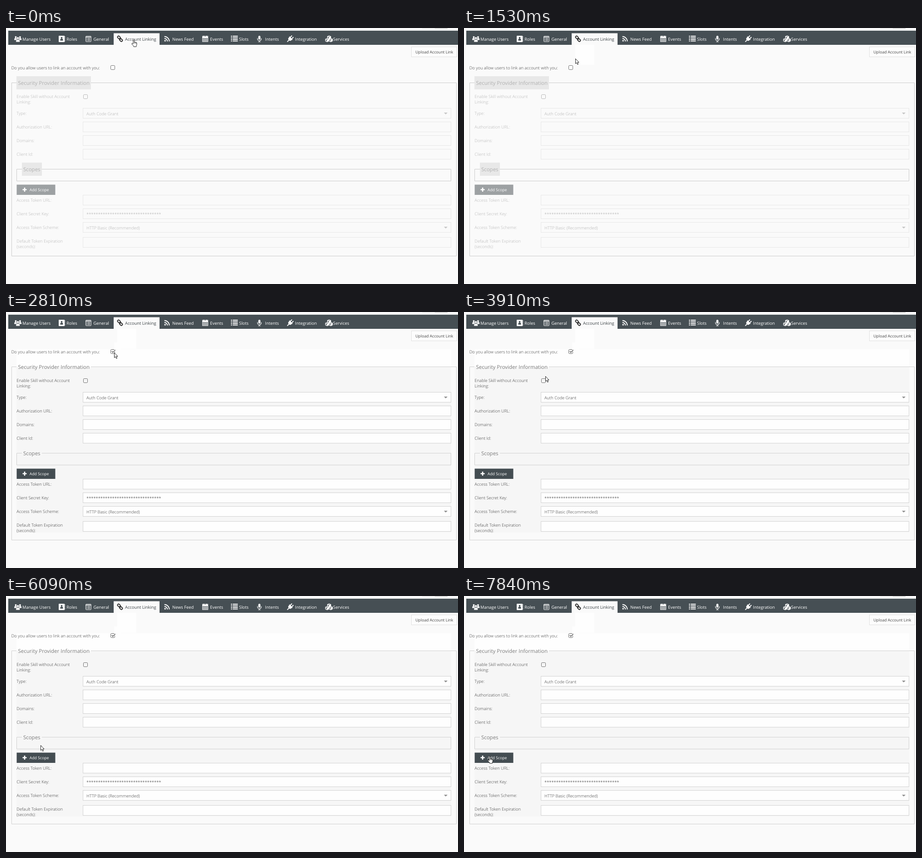
Animation of 995x563 px, one loop 7.99 s. Source, as an HTML page:

```html
<!DOCTYPE html>
<html lang="en">
<head>
<meta charset="utf-8">
<title>Account Linking</title>
<style>
html, body { margin: 0; width: 100%; height: 100%; overflow: hidden; background: #fafafa; }
svg { display: block; width: 100%; height: 100%; }
#stage {
  --label: #b2b2b2; --value: #adadad; --line: #e7e7e7; --field: #fafafa; --caret: #c6c6c6;
  --legend: #b0b0b0; --legend-bg: #e8e8e8; --button: #9da1a3; --box: #b8b8b8; --frame: #cbcbcb;
}
#stage.on {
  --label: #333; --value: #333; --line: #d2d2d2; --field: #fefefe; --caret: #909090;
  --legend: #7c7c7c; --legend-bg: #f6f6f6; --button: #444d52; --box: #707070; --frame: #d0d0d0;
}
text { font: 300 9.33px "Open Sans", sans-serif; text-rendering: geometricPrecision; }
.nav { font-weight: 400; font-size: 9.35px; fill: #fff; }
.small { font-weight: 400; font-size: 8.7px; }
.legend { font-weight: 400; font-size: 11.5px; fill: var(--legend); }
.label { fill: var(--label); }
.value { fill: var(--value); }
.field { fill: var(--field); stroke: var(--line); }
.caret { fill: var(--caret); }
.legend-bg { fill: var(--legend-bg); }
.frame { fill: none; stroke: var(--frame); }
.check { fill: none; stroke: var(--box); }
.line { fill: none; stroke: currentColor; }
.icon { color: #fff; fill: currentColor; }
.active .icon { color: #333; }
.active .nav { fill: #3d4448; }
.cut { color: #464f54; fill: #464f54; }
.pointer { fill: #fff; stroke: #222; stroke-linejoin: round; }
</style>
</head>
<body>
<svg id="stage" viewBox="0 0 995 563" preserveAspectRatio="none">
  <rect width="995" height="563" fill="#fafafa"/>
  <path d="M5 3h990v3H5z" fill="#f0f2f2"/>
  <path d="M916 0h28v2h-28z" fill="#eee"/>
  <path d="M944 0h28v2h-28z" fill="#d9d9d9"/>
  <path d="M5 6h990v31H5z" fill="#464f54"/>
  <path d="M237 11.5h101V37H237z" fill="#fafafa"/>
  <path id="trail" fill="#fefefe"/>
  <g id="panel">
    <path d="M23 82h957v39H23z" fill="#fefefe"/>
    <path d="M23 121h957v364H23z" fill="#f6f6f6"/>
  </g>
  <g id="nav"></g>
  <rect x="892.5" y="41.5" width="100" height="22" fill="#fcfcfc" stroke="#e0e0e0"/>
  <text class="small" x="901.3" y="56" fill="#444">Upload Account Link</text>
  <text x="11.7" y="90.5" fill="#333">Do you allow users to link an account with you:</text>
  <rect id="unchecked" x="230.5" y="82.5" width="9" height="9" rx="1.8" fill="#fdfdfd"/>
  <g id="checked" fill="none" stroke="#666">
    <path d="M239.5 87.5v2q0 2-2 2h-5q-2 0-2-2v-5q0-2 2-2h6"/>
    <path d="M232.7 86.3l2.6 2.5 5.3-5.3" stroke-width="1.6"/>
  </g>
  <path class="frame" d="M23 120.5H12.5v381h979v-381H187"/>
  <path class="frame" d="M35 310.5H23.5v26h956v-26H79"/>
  <path class="legend-bg" d="M23 106h164v29H23zM35 296h44v29H35z"/>
  <path id="legend-top" d="M23 106h164v15H23z" fill="#fefefe"/>
  <text class="legend" x="26.5" y="124.5">Security Provider Information</text>
  <text class="legend" x="37.9" y="314.8">Scopes</text>
  <text class="label" x="23.3" y="154">Enable Skill without Account<tspan x="23.3" dy="12">Linking:</tspan></text>
  <rect class="check" x="170.5" y="146.5" width="9" height="9" rx="1.8"/>
  <g id="form"></g>
  <path d="M23.5 344.5h85V367h-85z" style="fill:var(--button)"/>
  <path d="M36.5 355.5h9M41 351v9" stroke="#fff" stroke-width="2.6"/>
  <text class="small" x="51.7" y="358.7" fill="#fff">Add Scope</text>
  <circle id="click" cx="238.5" cy="89.5" r="7.5" fill="none" stroke="#333"/>
  <g id="cursor">
    <path id="arrow" class="pointer" d="M.5.5v11L3 9.2l1.8 4.1 1.8-.8-1.7-4H8z"/>
    <g id="hand">
      <path class="pointer" d="M4 10V2a1.2 1.2 0 0 1 2.4 0v4q1.2-.7 1.9.4 1.3-.6 1.8.5 1.7-.4 1.7 1.2v3q0 2-1 3v2H5v-1.5L.9 10.4q-.5-1.5.8-1.6z"/>
      <path d="M6.4 6v3m1.9-2.5V9m1.8-2v2" stroke="#222" stroke-width=".8"/>
    </g>
  </g>
</svg>
<script>
const LOOP = 7990, STEP = 137;
const CLICK = 2650, ENABLED = 2810;
const $ = id => document.getElementById(id);
const repeat = (n, draw) => Array.from({ length: n }, (_, i) => draw(i)).join('');

const stroke = (d, width = 1) => `<path class="line" stroke-width="${width}" d="${d}"/>`;
const box = (w, h, rest = '') => `<rect class="line" x="1" y="1" width="${w}" height="${h}" ${rest}/>`;
const person = (x, y, r) => `<g transform="translate(${x} ${y}) scale(${r})">
  <circle r="1"/><path d="M-1.6 3.2v-1q0-1.2 1.6-1.2t1.6 1.2v1z"/></g>`;
const cube = (x, y) => `<g transform="translate(${x} ${y})">
  ${stroke('M0 0l3.6-1.5L7.2 0v4L3.6 5.7 0 4zl3.6 1.5L7.2 0M3.6 1.5v4', 1.3)}<path d="M3.6 1.5L7.2 0v4L3.6 5.7z"/></g>`;
const chainLink = (x, y) =>
  `<rect class="line" x="-3.5" y="-2.3" width="7" height="4.6" rx="2.2" stroke-width="1.9" transform="translate(${x} ${y}) rotate(45)"/>`;

const icons = {
  users: person(3.3, 3, 2) + person(12.7, 3, 2) + `<g stroke="#464f54" stroke-width=".3">${person(8, 5.3, 2.7)}</g>`,
  badge: `<rect x=".5" width="13" height="14" rx="1"/><g class="cut">${person(7, 4.7, 1.9)}</g>` +
    stroke(repeat(3, i => `M14.5 ${2 + i * 4}v2`)),
  form: box(11.5, 12, 'rx="1"') + stroke('M1 3h11', 1.5) +
    stroke(repeat(3, i => `M2.5 ${5.7 + i * 2.3}h1.5m1 0h5.5`)),
  link: chainLink(4.5, 3.8) + chainLink(9, 9.5) + stroke('M5.3 5.3l3 3', 1.9),
  feed: '<circle cx="2" cy="11" r="1.7"/>' +
    stroke('M.5 6A6.5 6.5 0 0 1 7 12.5M.5 1.8a10.7 10.7 0 0 1 10.7 10.7', 1.9),
  calendar: '<path d="M.5 2h13v3H.5z"/>' + box(12, 12) +
    stroke(repeat(3, i => `M${4 + i * 3} 5v8M1 ${4.8 + i * 3}h12`), .9) + stroke('M4 0v3m6-3v3', 2),
  list: stroke(repeat(4, i => `M0 ${1 + i * 3.5}h2.5m1.5 0h11`), 2),
  mic: '<rect x="3" width="4.6" height="8.5" rx="2.3"/>' +
    stroke('M1 5.5v1.2a4.3 4.3 0 0 0 8.6 0V5.5M5.3 11v2.5m-2.5 0h5', 1.2),
  plug: `<g transform="rotate(45 7 7)"><path d="M2 4h10v1.5h-1v2Q11 11 7 11T3 7.500v-2H2z"/>
    ${stroke('M4.7 4.5V-1m4.6 5.5V-1M7 10v6', 1.9)}</g>`,
  cubes: cube(5.5, 1.7) + cube(1.2, 7.5) + cube(9.2, 7.5)
};

const navItem = (icon, x, label) => `<g class="${icon === 'link' ? 'active' : ''}">
  <g class="icon" transform="translate(${x - 17.8} 17)">${icons[icon]}</g>
  <text class="nav" x="${x}" y="27.7">${label}</text></g>`;
$('nav').innerHTML =
  navItem('users', 36, 'Manage Users') + navItem('badge', 133.3, 'Roles') +
  navItem('form', 192.5, 'General') + navItem('link', 262, 'Account Linking') +
  navItem('feed', 366, 'News Feed') + navItem('calendar', 449.3, 'Events') +
  navItem('list', 513, 'Slots') + navItem('mic', 570.3, 'Intents') +
  navItem('plug', 636.3, 'Integration') + navItem('cubes', 720, 'Services');

// Rows are 30 apart; a two-line label pushes its field down a little.
function formRow({ label, value = '', select }, top) {
  const lines = label.split('\n');
  if (lines.length > 1) top += 3;
  const base = top + (lines.length > 1 ? 12 : 15);
  return lines.map((s, i) => `<text class="label" x="23.3" y="${base + i * 12}">${s}</text>`).join('') +
    `<rect class="field" x="169.5" y="${top + .5}" width="810" height="22"/>` +
    `<text class="value" x="177" y="${top + 16}">${value}</text>` +
    (select ? `<path class="caret" d="M964 ${top + 10}h8l-4 4z"/>` : '');
}
const formGroup = (top, rows) => rows.map((row, i) => formRow(row, top + i * 30)).join('');
$('form').innerHTML = formGroup(176, [
  { label: 'Type:', value: 'Auth Code Grant', select: true },
  { label: 'Authorization URL:' },
  { label: 'Domains:' },
  { label: 'Client Id:' }
]) + formGroup(367, [
  { label: 'Access Token URL:' },
  { label: 'Client Secret Key:', value: '*'.repeat(32) },
  { label: 'Access Token Scheme:', value: 'HTTP Basic (Recommended)', select: true },
  { label: 'Default Token Expiration\n(seconds):' }
]);

// Each move ends at a point, reached in a number of equal steps.
const home = { x: 276, y: 25 };
const moves = [
  { end: 1530, steps: 3, x: 245, y: 67 },
  { end: 1810, steps: 2, x: 238, y: 89 },
  { end: 3230, steps: 2, x: 286, y: 120 },
  { end: 3910, steps: 3, x: 179, y: 141 },
  { end: 4050, steps: 1, x: 166, y: 147 },
  { end: 4510, steps: 3, x: 174, y: 141 },
  { end: 5660, steps: 4, x: 83, y: 276 },
  { end: 6090, steps: 1, x: 76, y: 328 },
  { end: 6370, steps: 2, x: 606, y: 342 },
  { end: 6770, steps: 2, x: 851, y: 302 },
  { end: 7580, steps: 6, x: 112, y: 345 },
  { end: 7840, steps: 2, x: 51.5, y: 352 }
];

function pointerAt(t) {
  let { x, y } = home;
  for (const move of moves) {
    const done = Math.floor((t - move.end) / STEP + move.steps + .1);
    if (done <= 0) break;
    const p = Math.min(1, done / move.steps);
    x += (move.x - x) * p;
    y += (move.y - y) * p;
  }
  return { x, y };
}

// The first two moves leave a slightly brighter area behind.
function trailPath(t) {
  const first = pointerAt(Math.min(t, moves[0].end));
  const last = pointerAt(Math.min(t, moves[1].end));
  if (first.x === home.x) return '';
  return `M${first.x} 37H287V${first.y + 14}H${first.x}z` +
    (t > moves[0].end ? `M${last.x} 67h15V${last.y + 9}h-15z` : '');
}

const show = (el, visible) => { el.style.display = visible ? '' : 'none'; };

function render(t) {
  const { x, y } = pointerAt(t);
  const on = t >= ENABLED;
  const clicking = t >= CLICK && !on;
  const hand = x === home.x || t >= 7720;
  $('cursor').setAttribute('transform', `translate(${x} ${y})`);
  $('trail').setAttribute('d', trailPath(t));
  show($('hand'), hand);
  show($('arrow'), !hand);
  show($('click'), clicking);
  show($('checked'), on);
  show($('unchecked'), !on);
  show($('panel'), on);
  show($('legend-top'), on);
  $('unchecked').setAttribute('stroke', clicking ? '#a9bccb' : '#707070');
  $('stage').classList.toggle('on', on);
}

const start = performance.now();
function tick() {
  render((performance.now() - start) % LOOP);
  requestAnimationFrame(tick);
}
tick();
</script>
</body>
</html>
```
